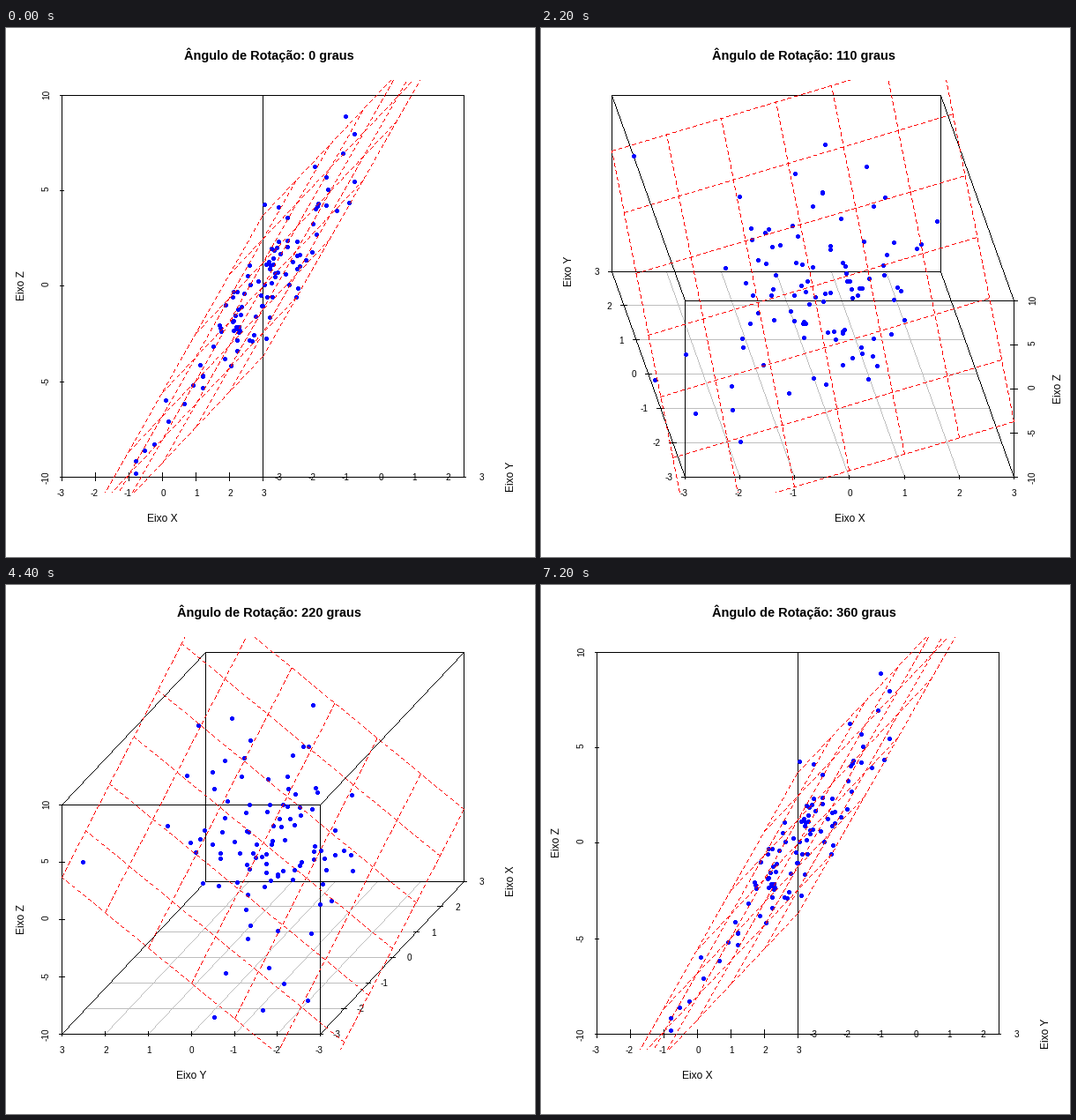
Recreate the animation shown at these times as a matplotlib script. Size 600x600 px, loop 7300 ms.

```python
import math
import random

import matplotlib.pyplot as plt
import numpy as np
from matplotlib.animation import FuncAnimation
from matplotlib.patches import PathPatch
from matplotlib.path import Path

SIZE = 600
PX = 0.72                      # points per pixel at 100 dpi
LEFT, RIGHT = 63.56, 536.44
TOP, BOTTOM = 76.36, 509.24
PAD = 16.78                    # room for the depth axis labels
CLIP = (44, 555, 59, 526)      # plot region in whole pixels
DEPTH = 6
TICKS = range(-3, 4)
GREY = "#bebebe"

plt.rcParams["font.family"] = "Liberation Sans"


def normals(seed, n):
    """Normal deviates: scrambled Mersenne Twister state, then inversion."""
    state = []
    for i in range(50 + 625):
        seed = (69069 * seed + 1) % 2**32
        if i > 50:
            state.append(seed)
    rng = random.Random()
    rng.setstate((3, tuple(state) + (624,), None))
    big = 2**27
    p = []
    for _ in range(n):
        high = int(big * (rng.getrandbits(32) / 2**32))
        p.append((high + rng.getrandbits(32) / 2**32) / big)
    grid = np.linspace(-5, 5, 20001)
    cdf = [0.5 * math.erfc(-g / math.sqrt(2)) for g in grid]
    return np.interp(p, cdf, grid)


px, py, noise = normals(42, 300).reshape(3, 100)
pz = 2 * px + 3 * py + noise
base, coef_x, coef_y = np.linalg.lstsq(
    np.column_stack([np.ones(100), px, py]), pz, rcond=None)[0]

fig = plt.figure(figsize=(6, 6), dpi=100, facecolor="white")
ax = fig.add_axes([0, 0, 1, 1])

CELL = np.array([(0, 0), (1, 0), (1, 1), (0, 1), (0, 0)])
CODES = [Path.MOVETO] + [Path.LINETO] * 3 + [Path.CLOSEPOLY]
DOT = np.array([(i, j) for i in range(-2, 3) for j in range(-2, 3)
                if abs(i * j) < 4])


def fill(cells, color, z):
    """Fill whole pixel cells, for crisp lines without smoothing."""
    verts = (cells[:, None] + CELL).reshape(-1, 2)
    path = Path(verts, np.tile(CODES, len(cells)))
    ax.add_artist(PathPatch(path, fc=color, lw=0, snap=False, zorder=z))


def trace(p, q, dashed):
    p, q = np.floor(p), np.floor(q)
    steps = int(max(abs(q - p).max(), 1))
    t = np.arange(steps + 1)[:, None] / steps
    cells = np.floor(p + t * (q - p) + 0.5)
    if dashed:
        cells = cells[(t[:, 0] * np.hypot(*(q - p)) + 0.5) % 8 < 5]
    return cells


def lines(segs, color="black", z=1, dashed=False):
    cells = np.concatenate([trace(*s, dashed) for s in segs])
    if dashed:
        x, y = cells.T
        x_min, x_max, y_min, y_max = CLIP
        cells = cells[(x >= x_min) & (x <= x_max)
                      & (y >= y_min) & (y <= y_max)]
    fill(cells, color, z)


def label(x, y, s, size=10, ha="center", turn=0, **kw):
    ax.text(x, y, s, fontsize=size * PX, ha=ha, va="baseline", rotation=turn,
            rotation_mode="anchor", zorder=2, **kw)


def draw(frame):
    ax.clear()
    ax.set_xlim(0, SIZE)
    ax.set_ylim(SIZE, 0)
    ax.axis("off")

    degrees = frame * 5
    a = degrees % 360 / 90
    yz = abs(a if a < 1 else a - 4 if a > 3 else 2 - a)
    yx = 1 - a if a < 2 else a - 3
    swap = a > 2
    z_right = 1 < a <= 2 or a > 3
    back_left = 1 < a <= 3
    lo, hi = (-3 + DEPTH * yx, 3) if back_left else (-3, 3 + DEPTH * yx)
    x0 = LEFT + PAD if z_right else LEFT
    width = RIGHT - LEFT - PAD
    unit = (BOTTOM - TOP) / (4 + DEPTH * yz)

    def pt(x, d, z):
        t = (x + d * yx - lo) / (hi - lo)
        if swap:
            t = 1 - t
        return x0 + t * width, BOTTOM - ((z + 10) / 5 + d * yz) * unit

    def edge(p, q):
        return pt(*p), pt(*q)

    depth_x, height_x = (-3, 3) if back_left else (3, -3)
    names = ("Eixo Y", "Eixo X") if swap else ("Eixo X", "Eixo Y")

    # floor grid
    lines([edge((x, 0, -10), (x, DEPTH, -10)) for x in TICKS]
          + [edge((-3, d, -10), (3, d, -10)) for d in range(DEPTH + 1)], GREY)

    # ticks
    segs = []
    for d in range(DEPTH + 1):
        segs.append(edge((depth_x - 0.06, d, -10), (depth_x + 0.06, d, -10)))
    for x in TICKS:
        segs.append(edge((x, 0, -10.2), (x, 0, -9.8)))
    for z in range(-10, 11, 5):
        segs.append(edge((height_x - 0.06, 0, z), (height_x + 0.06, 0, z)))

    # box
    for x in (-3, 3):
        for z in (-10, 10):
            segs.append(edge((x, 0, z), (x, DEPTH, z)))
        for d in (0, DEPTH):
            segs.append(edge((x, d, -10), (x, d, 10)))
    for d in (0, DEPTH):
        for z in (-10, 10):
            segs.append(edge((-3, d, z), (3, d, z)))
    lines(segs, z=2)

    # labels
    for i, v in enumerate(TICKS):
        label(pt(v, 0, 0)[0] + 3.2, 531, str(v), ha="right")
        x, y = pt(depth_x, i, -10)
        label(x + (-14 if z_right else 22.3), y + 3.7, str(v), ha="right")
    for v in range(-10, 11, 5):
        s = str(v)
        y = pt(0, 0, v)[1] + 0.7 - 1.5 * (3 - len(s))
        label(561 if z_right else 49, y, s, turn=90)
    label(pt(0, 0, 0)[0], 560, names[0], 12)
    label(35 if z_right else 576, pt(0, DEPTH, -10)[1], names[1], 12, turn=90)
    label(590 if z_right else 21, pt(0, 0, 0)[1] - 0.7, "Eixo Z", 12, turn=90)
    label(298.4, 36, f"Ângulo de Rotação: {degrees} graus", 14.5,
          weight="bold")

    # points
    u, v = (py, px) if swap else (px, py)
    spots = np.floor(np.column_stack(pt(u, v + 3, pz)))
    fill((spots[:, None] + DOT).reshape(-1, 2), "blue", 3)

    # fitted plane
    cu, cv = (coef_y, coef_x) if swap else (coef_x, coef_y)

    def on_plane(x, d):
        return pt(x, d, base + cu * x + cv * (d - 3))

    lines([(on_plane(x, 0), on_plane(x, DEPTH)) for x in TICKS]
          + [(on_plane(-3, d), on_plane(3, d)) for d in range(DEPTH + 1)],
          "red", 4, dashed=True)
    return []


anim = FuncAnimation(fig, draw, frames=73, interval=100, repeat=True,
                     repeat_delay=0, init_func=lambda: [], blit=False)
plt.show()
```
